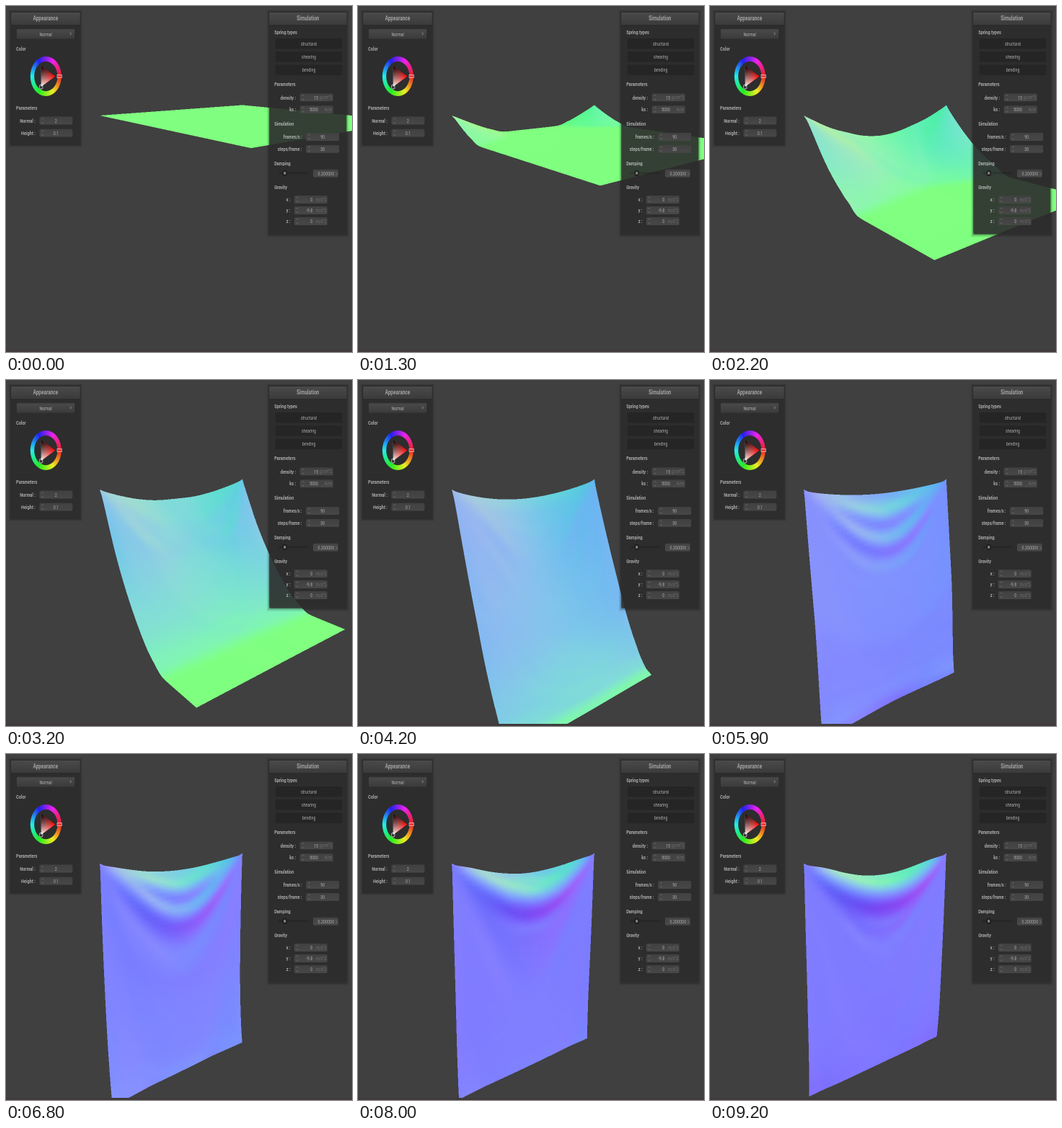
These frames come from a looping animation (480x480 px, 9300 ms). An HTML page with a canvas:

```html
<!DOCTYPE html>
<html lang="en">
<head>
<meta charset="utf-8">
<title>Cloth simulation</title>
<style>
  html, body { margin: 0; height: 100%; overflow: hidden; background: #404040; }
  canvas { display: block; width: 480px; height: 480px; }
</style>
</head>
<body>
<canvas id="stage" width="480" height="480"></canvas>
<script>
const ctx = document.getElementById('stage').getContext('2d');
const SIZE = 480, LOOP = 9300, FRAME = 100;

// ---- Cloth: a square mass-spring sheet, two corners pinned ----
const N = 50, COUNT = N * N;
const KS = 5000, MASS = 15 / COUNT, DT = 1 / 2700, KEEP = 1 - 0.002, GRAVITY = -9.8;
const START = 440, STEPS_PER_MS = 0.4725;
const pos = new Float64Array(COUNT * 3);
const force = new Float64Array(COUNT * 3);
const isPinned = i => i === 0 || i === N - 1;

for (let i = 0; i < COUNT; i++) {
  pos[i * 3] = (i % N) / (N - 1);
  pos[i * 3 + 2] = Math.floor(i / N) / (N - 1);
}
const last = pos.slice();

const links = [];
function link(x, z, dx, dz, k) {
  const x2 = x + dx, z2 = z + dz;
  if (x2 < 0 || x2 >= N || z2 < 0) return;
  links.push([z * N + x, z2 * N + x2, Math.hypot(dx, dz) / (N - 1), k]);
}
for (let z = 0; z < N; z++) for (let x = 0; x < N; x++) {
  link(x, z, -1, 0, KS);
  link(x, z, 0, -1, KS);
  link(x, z, -1, -1, KS);
  link(x, z, 1, -1, KS);
  link(x, z, -2, 0, KS * 0.2);
  link(x, z, 0, -2, KS * 0.2);
}
const endA = Int32Array.from(links, l => l[0] * 3);
const endB = Int32Array.from(links, l => l[1] * 3);
const rest = Float64Array.from(links, l => l[2]);
const stiff = Float64Array.from(links, l => l[3]);

function step() {
  force.fill(0);
  for (let s = 0; s < rest.length; s++) {
    const a = endA[s], b = endB[s];
    const dx = pos[b] - pos[a], dy = pos[b + 1] - pos[a + 1], dz = pos[b + 2] - pos[a + 2];
    const f = stiff[s] * (1 - rest[s] / Math.sqrt(dx * dx + dy * dy + dz * dz));
    force[a] += f * dx; force[a + 1] += f * dy; force[a + 2] += f * dz;
    force[b] -= f * dx; force[b + 1] -= f * dy; force[b + 2] -= f * dz;
  }
  for (let i = 0; i < pos.length; i++) {
    if (isPinned((i / 3) | 0)) continue;
    const p = pos[i], g = i % 3 === 1 ? GRAVITY : 0;
    pos[i] += KEEP * (p - last[i]) + (force[i] / MASS + g) * DT * DT;
    last[i] = p;
  }
}

const poses = [];
let stepsDone = 0;
function poseAt(n) {
  while (poses.length <= n) {
    const target = Math.round((poses.length * FRAME - START) * STEPS_PER_MS);
    for (; stepsDone < target; stepsDone++) step();
    poses.push(pos.slice());
  }
  return poses[n];
}

// ---- Rasteriser: smooth triangles with a depth buffer, coloured by normal ----
const RES = SIZE * 2;
const layer = document.createElement('canvas');
layer.width = layer.height = RES;
const layerCtx = layer.getContext('2d');
const image = layerCtx.createImageData(RES, RES);
const nearness = new Float32Array(RES * RES);
const rad = Math.PI / 180;
const cosH = Math.cos(36.5 * rad), sinH = Math.sin(36.5 * rad);
const cosT = Math.cos(12.7 * rad), sinT = Math.sin(12.7 * rad);

function project(p, i) {
  const x = p[i * 3], y = p[i * 3 + 1], z = p[i * 3 + 2];
  const away = x * sinH - z * cosH;
  const depth = 1.832 + away * cosT - y * sinT;
  const right = -0.3915 + x * cosH + z * sinH;
  const up = 0.2448 + y * cosT + away * sinT;
  return { x: 2 * (240 + 514.7 * right / depth), y: 2 * (240 - 658.8 * up / depth), near: 1 / depth };
}

function normalColor(p, i) {
  const x = i % N, z = (i - x) / N;
  const along = (i1, i0) => [0, 1, 2].map(k => p[i1 * 3 + k] - p[i0 * 3 + k]);
  const u = along(z < N - 1 ? i + N : i, z ? i - N : i);
  const v = along(x < N - 1 ? i + 1 : i, x ? i - 1 : i);
  const n = [u[1] * v[2] - u[2] * v[1], u[2] * v[0] - u[0] * v[2], u[0] * v[1] - u[1] * v[0]];
  const length = Math.hypot(...n);
  return n.map(c => 127.5 * (1 + c / length));
}

function triangle(a, b, c) {
  const area = (b.x - a.x) * (c.y - a.y) - (b.y - a.y) * (c.x - a.x);
  if (!area) return;
  const x0 = Math.max(0, Math.floor(Math.min(a.x, b.x, c.x)));
  const x1 = Math.min(RES - 1, Math.ceil(Math.max(a.x, b.x, c.x)));
  const y0 = Math.max(0, Math.floor(Math.min(a.y, b.y, c.y)));
  const y1 = Math.min(RES - 1, Math.ceil(Math.max(a.y, b.y, c.y)));
  for (let y = y0; y <= y1; y++) for (let x = x0; x <= x1; x++) {
    const px = x + 0.5 - a.x, py = y + 0.5 - a.y;
    const wb = (px * (c.y - a.y) - py * (c.x - a.x)) / area;
    const wc = (py * (b.x - a.x) - px * (b.y - a.y)) / area;
    const wa = 1 - wb - wc;
    if (wa < 0 || wb < 0 || wc < 0) continue;
    const at = y * RES + x, near = wa * a.near + wb * b.near + wc * c.near;
    if (near < nearness[at]) continue;
    nearness[at] = near;
    for (let k = 0; k < 3; k++) {
      image.data[at * 4 + k] = wa * a.color[k] + wb * b.color[k] + wc * c.color[k];
    }
    image.data[at * 4 + 3] = 255;
  }
}

function drawCloth(p) {
  image.data.fill(0);
  nearness.fill(0);
  const v = Array.from({ length: COUNT }, (_, i) => ({ ...project(p, i), color: normalColor(p, i) }));
  for (let z = 0; z < N - 1; z++) for (let x = 0; x < N - 1; x++) {
    const i = z * N + x;
    triangle(v[i], v[i + 1], v[i + N]);
    triangle(v[i + 1], v[i + N + 1], v[i + N]);
  }
  layerCtx.putImageData(image, 0, 0);
  ctx.drawImage(layer, 0, 0, SIZE, SIZE);
}

// ---- Panels, in the coordinates of a 1024 x 800 window ----
const white = alpha => `rgba(255,255,255,${alpha})`;
const black = alpha => `rgba(0,0,0,${alpha})`;

function text(str, x, y, { size = 12, weight = 'bold', align = 'left', color = white(0.6) } = {}) {
  ctx.font = `${weight} ${size}px Roboto, sans-serif`;
  ctx.textAlign = align;
  ctx.textBaseline = 'middle';
  ctx.fillStyle = color;
  ctx.fillText(str, x, y + 1);
}

function box(x, y, w, h, top, bottom) {
  const fill = ctx.createLinearGradient(0, y, 0, y + h);
  fill.addColorStop(0, top);
  fill.addColorStop(1, bottom);
  ctx.fillStyle = fill;
  ctx.beginPath();
  ctx.roundRect(x, y, w, h, 3);
  ctx.fill();
}

function outline(x, y, w, h, color) {
  ctx.strokeStyle = color;
  ctx.lineWidth = 1;
  ctx.strokeRect(x, y, w, h);
}

function polyline(points, color) {
  ctx.beginPath();
  points.forEach(([x, y]) => ctx.lineTo(x, y));
  ctx.strokeStyle = color;
  ctx.lineWidth = 1.5;
  ctx.stroke();
}

function panel(title, x, y, w, h) {
  for (let i = 1; i < 10; i++) outline(x - i + 0.5, y - i + 0.5, w + 2 * i - 1, h + 2 * i - 1, black(0.45 * (1 - i / 10) ** 2));
  box(x, y, w, h, 'rgba(43,43,43,.9)', 'rgba(43,43,43,.9)');
  box(x, y, w, 30, '#4a4a4a', '#3a3a3a');
  polyline([[x, y + 29.5], [x + w, y + 29.5]], black(0.35));
  text(title, x + w / 2, y + 14, { size: 13.8, align: 'center', color: white(0.5) });
}

function button(label, x, y, w, top, bottom) {
  box(x, y, w, 24, top, bottom);
  text(label, x + w / 2, y + 12, { size: 11.2, weight: 'normal', align: 'center', color: white(0.62) });
}

function field(label, labelEnd, x, y, value, unit) {
  text(label + ' :', labelEnd, y, { align: 'right' });
  box(x, y - 9, 98, 18, '#414141', '#474747');
  polyline([[x + 6, y - 3], [x + 9, y - 6], [x + 12, y - 3]], white(0.2));
  polyline([[x + 6, y + 3], [x + 9, y + 6], [x + 12, y + 3]], white(0.2));
  const style = { size: 11.5, weight: 'normal', color: white(0.55) };
  if (!unit) return text(value, x + 49, y, { ...style, align: 'center' });
  text(value, x + 54, y, { ...style, align: 'right' });
  text(unit, x + 95, y, { ...style, size: 11, align: 'right', color: white(0.22) });
}

function colorWheel(x, y) {
  const outer = 46, inner = 34.5, r = 28.5;
  const ax = -r / 2, ay = r * Math.sin(120 * rad);
  ctx.save();
  ctx.translate(x, y);
  const hues = ctx.createConicGradient(0, 0, 0);
  for (let i = 0; i <= 12; i++) hues.addColorStop(i / 12, `hsl(${i * 30},85%,53%)`);
  ctx.beginPath();
  ctx.arc(0, 0, outer, 0, 7);
  ctx.closePath();
  ctx.moveTo(inner, 0);
  ctx.arc(0, 0, inner, 0, 7);
  ctx.fillStyle = hues;
  ctx.fill('evenodd');

  const tri = new Path2D(`M${r} 0L${ax} ${ay}L${ax} ${-ay}Z`);
  const tint = ctx.createLinearGradient(r, 0, ax, ay);
  tint.addColorStop(0, 'hsl(0,100%,50%)');
  tint.addColorStop(1, '#fff');
  const shade = ctx.createLinearGradient((r + ax) / 2, ay / 2, ax, -ay);
  shade.addColorStop(0, black(0));
  shade.addColorStop(1, '#000');
  for (ctx.fillStyle of [tint, shade]) ctx.fill(tri);
  ctx.lineWidth = 1;
  ctx.strokeStyle = black(0.25);
  ctx.stroke(tri);

  ctx.lineWidth = 2;
  ctx.strokeStyle = white(0.6);
  ctx.strokeRect(inner - 1, -3, outer - inner + 2, 6);
  ctx.beginPath();
  ctx.arc(ax, ay, 5, 0, 7);
  ctx.stroke();
  ctx.restore();
}

function drawPanels() {
  ctx.save();
  ctx.scale(SIZE / 1024, SIZE / 800);

  panel('Appearance', 15, 15, 204, 305);
  button('Normal', 31, 53, 173, '#4a4a4a', '#3a3a3a');
  outline(31.5, 53.5, 172, 23, black(0.3));
  polyline([[190, 61], [193, 64], [190, 67]], white(0.5));
  text('Color', 30, 99);
  colorWheel(118, 162.5);
  text('Parameters', 30, 235);
  field('Normal', 87, 99, 265, '2');
  field('Height', 87, 99, 293.5, '0.1');

  panel('Simulation', 779, 15, 229, 513);
  text('Spring types', 794, 61);
  ['structural', 'shearing', 'bending'].forEach((label, i) =>
    button(label, 797, 75 + i * 30.5, 198, '#252525', '#252525'));
  text('Parameters', 794, 181);
  field('density', 858, 870, 211.5, '15', 'g/cm^2');
  field('ks', 858, 870, 239.5, '5000', 'N/m');
  text('Simulation', 794, 272);
  field('frames/s', 876, 888, 302.5, '90');
  field('steps/frame', 876, 888, 330.5, '30');

  text('Damping', 794, 363);
  box(806, 384, 90, 5, black(0.18), black(0.1));
  ctx.fillStyle = '#1f1f1f';
  ctx.beginPath();
  ctx.arc(825, 386.5, 7, 0, 7);
  ctx.fill();
  ctx.fillStyle = '#858585';
  ctx.beginPath();
  ctx.arc(825, 386.5, 3.5, 0, 7);
  ctx.fill();
  box(909, 378, 74, 18, '#434343', '#4a4a4a');
  text('0.200000', 971, 387, { size: 11.5, weight: 'normal', align: 'right', color: white(0.55) });
  text('%', 982, 387, { size: 11, weight: 'normal', align: 'right', color: white(0.22) });

  text('Gravity', 794, 418);
  field('x', 842, 853, 447.5, '0', 'm/s^2');
  field('y', 842, 853, 472.5, '-9.8', 'm/s^2');
  field('z', 842, 853, 497.5, '0', 'm/s^2');
  ctx.restore();
}

// ---- Loop ----
const began = performance.now();
let shown = -1;
function tick() {
  const n = Math.floor(((performance.now() - began) % LOOP) / FRAME);
  if (n !== shown) {
    shown = n;
    ctx.fillStyle = '#404040';
    ctx.fillRect(0, 0, SIZE, SIZE);
    drawCloth(poseAt(n));
    ctx.fillStyle = '#403a3c';
    ctx.fillRect(0, 477, SIZE, 3);
    drawPanels();
  }
  requestAnimationFrame(tick);
}
tick();
</script>
</body>
</html>
```
